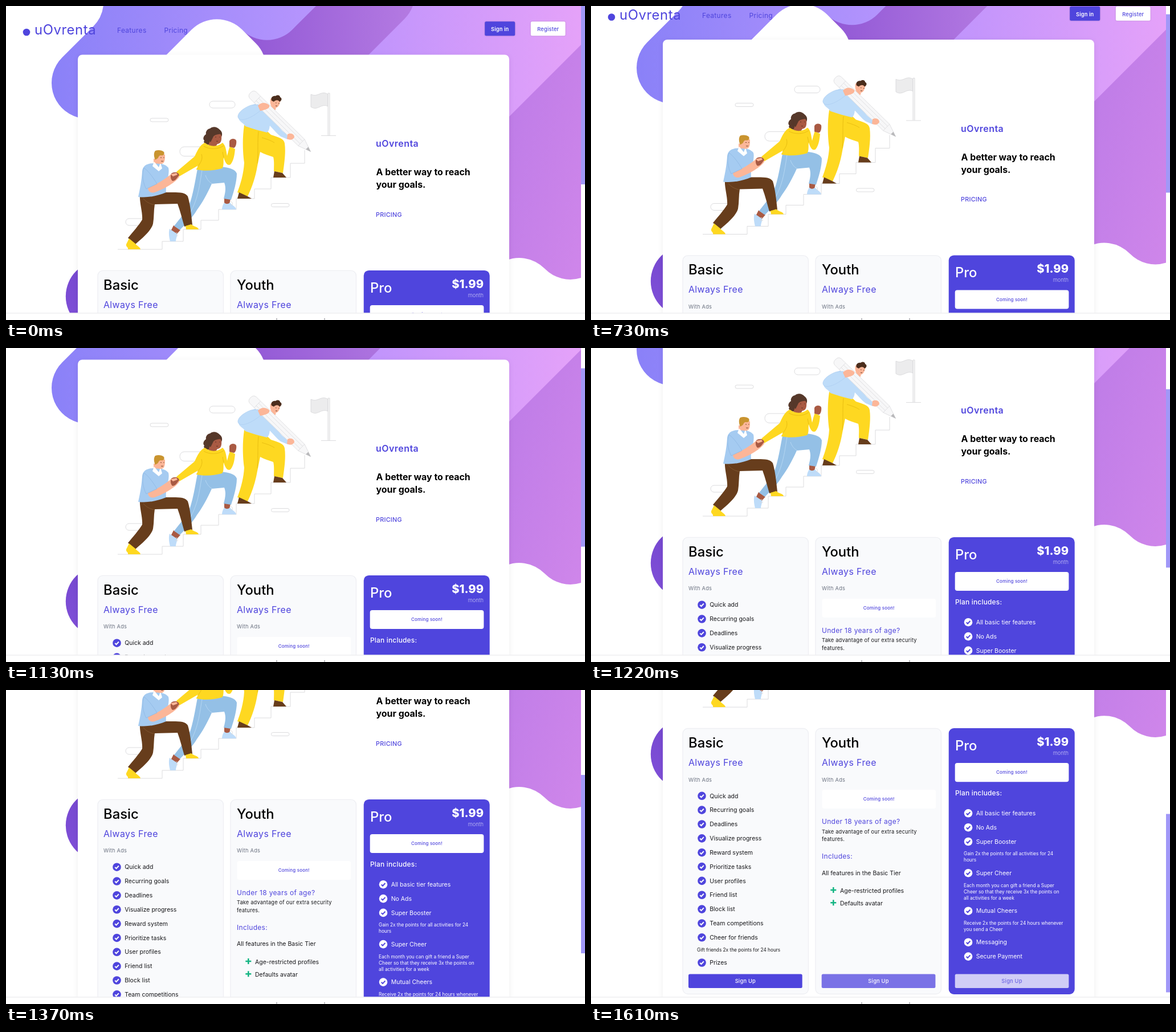
Animation, 1016 px wide and 551 px high, one loop 8000 ms. Source, as an HTML page:

```html
<!DOCTYPE html>
<html lang="en">
<head>
<meta charset="utf-8">
<title>Pricing page scroll</title>
<style>
html, body { margin: 0; width: 100%; height: 100%; overflow: hidden; background: #fff; }
svg { display: block; width: 1016px; height: 551px; font-family: Inter, sans-serif; font-optical-sizing: none; --brand: #4f45dd; }
text { white-space: pre; }
.brand { fill: var(--brand); }
.wide { letter-spacing: .025em; }
.mid { text-anchor: middle; font-weight: 500; letter-spacing: .025em; }
.title { font-size: 23.8px; font-weight: 500; }
.sub { font-size: 15.9px; letter-spacing: .025em; }
.nav { font-size: 12px; letter-spacing: .025em; }
.btn { font-size: 9.26px; }
.soon { font-size: 7.94px; }
.item { font-size: 10.5px; }
.note { font-size: 8.25px; }
.line { fill: none; stroke: #d9d9db; stroke-width: .9; }
.yellow { fill: #fed821; }
.pale { fill: #bedcf9; }
.jeans { fill: #94c0e6; }
.brown { fill: #673d1c; }
.skin { fill: #fcb698; }
.dark { fill: #a95a43; }
.card { fill: #f9fafc; stroke: #eeeff3; stroke-width: 1.3; }
.lift { filter: drop-shadow(0 .7px 1px #0003); }
</style>
</head>
<body>
<svg viewBox="0 0 1016 551">
  <defs>
    <linearGradient id="violet"><stop stop-color="#8a81f8"/><stop offset="1" stop-color="#b795fd"/></linearGradient>
    <linearGradient id="purple"><stop stop-color="#8d54d4"/><stop offset="1" stop-color="#b57be2"/></linearGradient>
    <linearGradient id="pink"><stop stop-color="#c094fc"/><stop offset="1" stop-color="#e5a2f9"/></linearGradient>
    <linearGradient id="orchid" x2="1" y2="1"><stop stop-color="#ba7ae7"/><stop offset="1" stop-color="#cf86ea"/></linearGradient>
    <linearGradient id="plum" x2="0" y2="1"><stop stop-color="#7648d0"/><stop offset="1" stop-color="#8050d8"/></linearGradient>
  </defs>

  <g id="page">
    <!-- diagonal bands whose ends share one corner radius -->
    <g id="backdrop">
      <path fill="url(#purple)" d="M380 0H720V90H380Z"/>
      <path fill="url(#orchid)" d="M870 0H1009V477A62.800 62.800 0 0 1 945.500 461A62.800 62.800 0 0 0 870 450Z"/>
      <path fill="url(#pink)" d="M713.800 0A62.800 62.800 0 0 1 699.400 22.400L636 86V100H883V194L1009 68V0Z"/>
      <path fill="url(#violet)" d="M170.800 0A62.800 62.800 0 0 1 153 36L98.400 90.600A62.800 62.800 0 0 0 126 195.500H300L325 43L413.600 41.400A62.800 62.800 0 0 0 502.400 41.400L544 0Z"/>
      <path fill="#fff" d="M270 97.200L325.600 41.600A62.800 62.800 0 0 1 414.400 41.600L438.400 65.600A62.800 62.800 0 0 1 452 86V97.200Z"/>
      <circle fill="url(#plum)" cx="167.600" cy="509.500" r="62.800"/>
    </g>

    <rect x="126" y="85.500" width="757" height="900" rx="8" fill="#fff" style="filter:drop-shadow(0 2px 5px #0001)"/>

    <g id="header" class="brand">
      <circle cx="36" cy="46" r="6.300"/>
      <text x="50" y="50" font-size="23.800" class="wide">uOvrenta</text>
      <text x="195" y="47" class="nav">Features</text>
      <text x="277.500" y="47" class="nav">Pricing</text>
      <rect class="lift" x="840.200" y="27.200" width="53" height="25" rx="2.500"/>
      <rect class="lift" x="920.800" y="27.200" width="60.800" height="25" rx="2.500" fill="#fff"/>
      <text x="866.700" y="44" class="mid btn" fill="#fff" style="font-weight:600;letter-spacing:.015em">Sign in</text>
      <text x="951.300" y="44" class="mid btn">Register</text>
    </g>

    <g id="hero">
      <text x="649" y="247" class="brand" font-size="15.900" font-weight="600" letter-spacing=".032em">uOvrenta</text>
      <g font-size="15.900" font-weight="700">
        <text x="649.500" y="297">A better way to reach</text>
        <text x="649.500" y="319">your goals.</text>
      </g>
      <text x="649" y="369.700" class="brand wide" font-size="10.800" font-weight="500">PRICING</text>
    </g>

    <g id="scenery" class="line">
      <rect x="357" y="167" width="45" height="12" rx="6"/>
      <rect x="253" y="197" width="32" height="6" rx="3"/>
      <rect x="305" y="247" width="50" height="16.500" rx="8"/>
      <rect x="465.500" y="346.500" width="31.500" height="6" rx="3"/>
      <rect x="210" y="373" width="40" height="12" rx="6"/>
      <path d="M196 427H274V413H311V392H342V376H373V357H404V338H436V321H465V301H499V276H524V253"/>
      <path fill="#ececed" d="M565 155C553 147 548 161 535 155V177C547 185 553 170 565 176Z"/>
      <path fill="#f6f6f6" d="M565 227V153H568V227M553 227.500H579"/>
    </g>

    <g id="leader">
      <path class="yellow" d="M418 209C414 235 416 262 418 275C417 295 411 314 406 327L424 334C432 318 438 299 441 281L446 256C453 260 461 262 469 265C471 273 470 282 470 290L486 293C489 272 491 256 489 241C488 233 478 230 465 226L450 212Z"/>
      <path fill="none" stroke="#e4b80f" stroke-width=".8" d="M443 220C441 240 443 250 441 276M449 231C459 234 465 236 471 240"/>
      <path class="brown" d="M409 327L424 334L431 338H406ZM471 290L485 293L492 301H469Z"/>
      <path class="pale" d="M436 172C420 178 409 184 407 194C409 204 416 204 420 211C432 215 445 219 458 222C463 217 462 213 463 210C470 217 475 224 482 229L494 234L497 225C487 224 481 215 476 207C473 197 470 188 462 180C454 173 447 170 436 172Z"/>
      <path class="skin" d="M463 174L474 180L468 189L455 182Z"/>
      <g transform="translate(434 157) rotate(44.4)" stroke="#dcdcde" stroke-width=".8">
        <path fill="#f7f7f8" d="M118-8H0Q-7-8-7 0T0 8H118L141 0Z"/>
        <path fill="none" d="M10-8V8M118-8V8M10-3H118M10 3H118"/>
        <path fill="#b9b9bb" stroke="none" d="M132-3L141 0L132 3Z"/>
      </g>
      <path class="pale" stroke="#a8caee" stroke-width=".6" d="M430 174C416 179 406 188 407 195C410 204 428 199 447 183L443 173Z"/>
      <path class="skin" d="M442 175C448 168 456 169 462 174C464 179 457 182 446 184ZM494 225C500 222 506 225 506 230C504 235 498 236 493 233Z"/>
      <path class="skin" d="M464 163C462 172 466 180 473 179C479 178 481 170 482 164L472 159Z"/>
      <path fill="#4b2d1c" d="M466 166C464 161 468 157 473 158C477 155 481 157 481 160C485 162 484 166 480 168C477 164 473 165 470 168Z"/>
      <path fill="none" stroke="#5a3420" stroke-width=".9" d="M473 170h1.500M478 171h1.500M473 175q2 1 3 0"/>
    </g>

    <g id="second">
      <path class="dark" d="M383 337L394 338L392 348L383 347ZM294 385L306 393L299 401L289 395Z"/>
      <path class="jeans" d="M337 281C333 300 330 322 324 342C318 360 304 374 295 386L305 393C318 380 328 370 335 358C344 346 353 330 361 312L383 310C387 320 384 330 382 338L395 340C400 325 405 308 405 294C402 286 392 284 378 282Z"/>
      <path fill="none" stroke="#b8d8f3" stroke-width=".9" d="M344 288C339 318 337 345 314 378M362 312C356 309 352 303 350 297"/>
      <path class="pale" d="M383 345C387 349 391 347 393 345C397 350 403 352 404 357H379C379 352 381 348 383 345ZM287 391L299 399C302 402 298 407 298 413H288C286 405 285 397 287 391Z"/>
      <path class="line" d="M394 343q5 2 3 5m-3 1h4M298 398q4 0 3 3m-4 2h5"/>
      <path fill="#56382a" d="M358 215C352 216 350 222 351 225C346 228 345 234 348 236C345 241 352 244 357 243C361 244 366 242 369 240L377 232C381 225 379 220 375 217C370 211 362 211 358 215Z"/>
      <path class="dark" d="M362 223C367 220 376 221 378 228C379 237 376 242 371 242L367 248H354L358 236C360 233 359 227 362 223Z"/>
      <path fill="#56382a" d="M357 218C364 215 374 220 378 224C371 226 365 225 363 231L359 239C355 236 354 225 357 218Z"/>
      <path class="yellow" d="M349 240C341 243 336 253 331 264L299 291L304 299L337 280C336 284 334 285 334 287C348 290 365 289 379 285C383 281 381 272 382 266C385 276 389 281 394 278C400 271 401 260 402 251L393 246C390 253 389 260 388 263C386 253 386 245 380 240C370 248 358 247 349 240Z"/>
      <path fill="none" stroke="#e4b80f" stroke-width=".8" d="M343 260C346 269 341 276 336 282M382 266L380 256M347 246C357 252 372 252 382 245"/>
      <path class="dark" d="M392 237C394 232 402 232 404 236C405 241 403 248 400 249L392 247Z"/>
      <path fill="none" stroke="#5a2b20" stroke-width=".9" d="M367 230h2M374 230h1.500M369 237q2 1 3 0"/>
    </g>

    <g id="helper">
      <path class="brown" d="M235 332C234 345 240 362 239 375C233 385 223 396 214 407L227 418C241 406 255 394 258 382C260 371 259 359 261 348L301 347C306 360 309 374 313 387L327 384C325 365 323 347 319 334C314 326 302 327 281 327Z"/>
      <path fill="none" stroke="#8a6038" stroke-width=".7" d="M241 338C247 345 253 347 260 349"/>
      <path class="yellow" d="M315 386L325 383C330 388 337 387 338 392H316ZM216 408L227 417C229 421 235 422 236 427H214C215 423 210 423 211 418Z"/>
      <path class="skin" d="M259 268H272V286H259Z"/>
      <path fill="#a5cbf1" d="M257 276C246 277 240 281 239 290C238 307 235 321 232 335C250 337 267 333 281 327C279 312 288 296 285 284C281 279 275 277 271 277Z"/>
      <path fill="#fff" d="M260 273L268 283L271 275L274 285L268 290L257 281Z"/>
      <path class="skin" d="M249 319C263 314 276 306 290 295C296 292 304 294 304 300C298 309 278 321 261 327C254 329 249 325 249 319Z"/>
      <path fill="#a5cbf1" stroke="#86b2df" stroke-width=".6" d="M242 284C251 290 260 304 265 312L246 321C240 310 238 293 242 284Z"/>
      <path class="dark" d="M290 294C296 290 303 292 304 297C300 301 298 307 292 307C289 304 288 299 290 294Z"/>
      <path class="skin" d="M289 295L299 293L301 296L293 299Z"/>
      <path class="skin" d="M262 260C261 271 266 278 273 277C279 276 279 269 279 261L271 257Z"/>
      <path fill="#c9942f" d="M262 270C259 264 259 257 262 254C267 252 274 253 277 256C279 260 276 263 272 262C267 262 268 267 265 268Z"/>
      <path fill="none" stroke="#6b3a22" stroke-width=".9" d="M271 266h2M276 266h1.500M272 272q2 1 4 0"/>
    </g>

    <g id="plans" transform="translate(0 396.9)">
      <rect class="card" x="161" y="67.500" width="220.500" height="466" rx="9"/>
      <rect class="card" x="394" y="67.500" width="220.500" height="466" rx="9"/>
      <rect class="brand" x="627.700" y="67" width="221" height="467" rx="9"/>
    </g>
  </g>

  <g id="scrollbar">
    <rect x="1009" width="7" height="551" fill="#fff"/>
    <rect id="thumb" x="1009" width="7" height="313" fill="#a198f8"/>
  </g>
  <g id="footer">
    <path fill="#fff" d="M0 538.500H1016V551H0Z"/>
    <path stroke="#e6e6e9" d="M0 539H1016"/>
    <path stroke="#8f8f96" stroke-width="1.300" d="M475 548v2.500M559 548v2.500"/>
  </g>
</svg>
<script>
const $ = id => document.getElementById(id);
const plans = $('plans');
const add = markup => plans.insertAdjacentHTML('beforeend', markup);
const BRAND = 'var(--brand)', INK = '#18181b';

const text = (x, y, str, cls, fill = INK, attrs = '') =>
  add(`<text x="${x}" y="${y}" class="${cls}" fill="${fill}" ${attrs}>${str}</text>`);

const button = (x, y, h, str, cls, back, fill, rx = 2.5) => {
  add(`<rect x="${x}" y="${y}" width="199.700" height="${h}" rx="${rx}" fill="${back}"/>`);
  text(x + 99.8, y + h / 2 + (cls === 'soon' ? 2.8 : 3.4), str, 'mid ' + cls, fill);
};

const check = (x, y, str, back, tick, fill) => {
  add(`<g transform="translate(${x} ${y})"><circle r="7.300" fill="${back}"/>
    <path d="M-3.300 .2L-1 2.500L3.400-2.200" fill="none" stroke="${tick}" stroke-width="2"/></g>`);
  text(x + 13.7, y + 3.7, str, 'item', fill);
};

const notes = (x, y, lines, fill) =>
  lines.forEach((line, i) => text(x, y + i * 11.1, line, 'note', fill));

// Basic
text(171, 101, 'Basic', 'title', '#000');
text(171, 133, 'Always Free', 'sub', BRAND);
text(171, 160.5, 'With Ads', 'btn wide', '#6b7280');
const basic = (str, y) => check(194.5, y, str, BRAND, '#f9fafc', INK);
['Quick add', 'Recurring goals', 'Deadlines', 'Visualize progress', 'Reward system', 'Prioritize tasks',
 'User profiles', 'Friend list', 'Block list', 'Team competitions', 'Cheer for friends']
  .forEach((str, i) => basic(str, 185.8 + i * 24.85));
notes(186, 459, ['Gift friends 2x the points for 24 hours'], INK);
basic('Prizes', 478.5);
button(171, 498.5, 24.5, 'Sign Up', 'btn', BRAND, '#fff');

// Youth
text(405, 101, 'Youth', 'title', '#000');
text(405, 133, 'Always Free', 'sub', BRAND);
text(405, 160.5, 'With Ads', 'btn wide', '#6b7280');
button(405.5, 175, 33, 'Coming soon!', 'soon', '#fff', BRAND, 4);
text(405, 235, 'Under 18 years of age?', 'nav', BRAND);
text(405, 251.6, 'Take advantage of our extra security', 'btn', INK, 'letter-spacing=".018em"');
text(405, 265.3, 'features.', 'btn', INK, 'letter-spacing=".018em"');
text(405, 296, 'Includes:', 'nav', BRAND);
text(405, 324.5, 'All features in the Basic Tier', 'item');
['Age-restricted profiles', 'Defaults avatar'].forEach((str, i) => {
  const y = 351 + i * 22.3;
  add(`<path d="M420.300 ${y}h10m-5-5v10" fill="none" stroke="#14b583" stroke-width="2.500"/>`);
  text(437, y + 5, str, 'item');
});
button(404.7, 498.5, 24.5, 'Sign Up', 'btn', '#7a72e6', '#fff');

// Pro
text(639, 106, 'Pro', 'title', '#fff');
text(838, 98, '$1.99', '', '#fff', 'text-anchor="end" font-size="20.200" font-weight="800"');
text(838, 114, 'month', 'btn', '#c9c6f5', 'text-anchor="end" font-weight="300"');
button(638.7, 128, 33.2, 'Coming soon!', 'soon', '#fff', BRAND, 4);
text(639, 185.4, 'Plan includes:', '', '#fff', 'font-size="11.900" font-weight="500" letter-spacing=".018em"');
[['All basic tier features', 216.3], ['No Ads', 241.2], ['Super Booster', 266], ['Super Cheer', 321.2],
 ['Mutual Cheers', 387.7], ['Messaging', 442.7], ['Secure Payment', 467.6]]
  .forEach(([str, y]) => check(662, y, str, '#fff', BRAND, '#fff'));
notes(654, 290.2, ['Gain 2x the points for all activities for 24', 'hours'], '#fff');
notes(654, 345.8, ['Each month you can gift a friend a Super', 'Cheer so that they receive 3x the points on', 'all activities for a week'], '#fff');
notes(654, 411.8, ['Receive 2x the points for 24 hours whenever', 'you send a Cheer'], '#fff');
button(638.7, 498.5, 24.5, 'Sign Up', 'btn', '#d0cdf6', '#6c64e2');

// Wheel scrolling in held steps: [start ms, scroll px]
const LOOP = 8000;
const STEPS = [[0, 0], [590, 10.6], [660, 20], [730, 26.5], [1060, 40], [1130, 65], [1220, 132],
  [1300, 202], [1370, 272], [1450, 338.6], [1540, 382], [1610, 396.9]];

function draw(now) {
  const t = now % LOOP;
  const [, y] = STEPS.findLast(([start]) => start <= t);
  $('page').setAttribute('transform', `translate(0 ${-y})`);
  $('thumb').setAttribute('y', y * .548);
  requestAnimationFrame(() => draw(performance.now()));
}
draw(performance.now());
</script>
</body>
</html>
```
